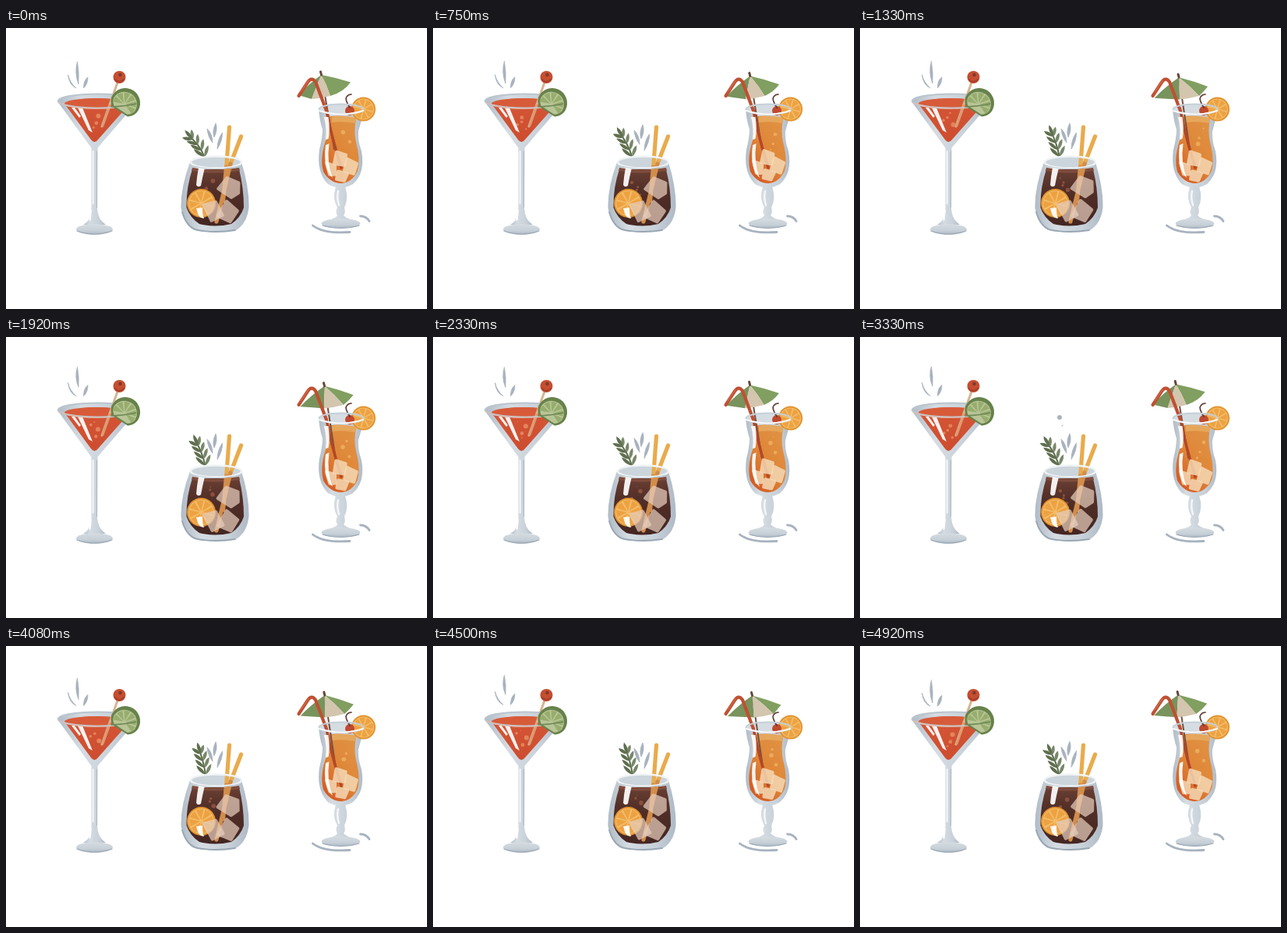
Animation of 540x360 px, one loop 5000 ms. Source, as an HTML page:

```html
<!DOCTYPE html>
<html lang="en">
<head>
<meta charset="utf-8">
<title>Three cocktails</title>
<style>
  html, body { margin: 0; width: 100%; height: 100%; overflow: hidden; background: #fff; }
  svg { display: block; width: 100vw; height: 100vh; }
  .line { fill: none; stroke-linecap: round; stroke-linejoin: round; }
  .ice { fill: #e6cdbc; stroke: #e6cdbc; stroke-width: 4; stroke-linejoin: round; opacity: .72; }
  #iceTop .ice { fill: #f6dcb9; stroke: #f6dcb9; opacity: .82; }
  .steam { fill: #a8b2be; stroke: #a8b2be; stroke-width: .8; stroke-linejoin: round; }
  .shine { fill: #fff; opacity: .92; }
</style>
</head>
<body>
<svg viewBox="0 0 540 360">
  <defs>
    <linearGradient id="wall" x1="0" x2="1">
      <stop offset="0" stop-color="#b0bbc6"/><stop offset=".3" stop-color="#d5dce2"/>
      <stop offset=".7" stop-color="#c8d1d9"/><stop offset="1" stop-color="#aeb9c5"/>
    </linearGradient>
    <linearGradient id="foot" x2="0" y2="1">
      <stop offset="0" stop-color="#d5dce1"/><stop offset=".65" stop-color="#c6cfd7"/>
      <stop offset="1" stop-color="#a9b5c1"/>
    </linearGradient>
    <linearGradient id="red" x2="0" y2="1">
      <stop offset="0" stop-color="#d55737"/><stop offset="1" stop-color="#cd4c2f"/>
    </linearGradient>
    <linearGradient id="amber" x1=".8" x2=".1" y2="1">
      <stop offset="0" stop-color="#e09244"/><stop offset=".5" stop-color="#df8638"/>
      <stop offset="1" stop-color="#d2521f"/>
    </linearGradient>
    <linearGradient id="cola" x2="0" y2="1">
      <stop offset="0" stop-color="#6a3f33"/><stop offset=".35" stop-color="#522f28"/>
      <stop offset="1" stop-color="#442622"/>
    </linearGradient>
  </defs>

  <!-- martini -->
  <g>
    <path id="puffM" class="steam"/>
    <path id="puffSides" class="steam" d="M79.500 60Q82 70 90 77Q81 73 79.500 60ZM105 63Q99.500 67 99.500 77Q105 72 105 63Z"/>
    <path d="M109.500 150H117.500L117 231Q118 246 128 252H99Q109 247 109.500 231Z" fill="url(#wall)"/>
    <path class="line" d="M111.700 158V225" stroke="#f3f5f7" stroke-width="2.200"/>
    <path class="line" d="M116.500 158V230" stroke="#aeb9c4" stroke-width="1.200"/>
    <ellipse cx="113.500" cy="258" rx="23.500" ry="6.800" fill="url(#foot)"/>
    <path class="line" d="M91 260Q113 268 136 260" stroke="#9ba8b5" stroke-width="1.200"/>
    <path class="line" d="M109 234L107.500 246" stroke="#fff" stroke-width="2"/>
    <path d="M66 94L109 153Q113.500 158 118 153L168 95Q158 84 118 84Q72 84 66 94Z" fill="url(#wall)"/>
    <path d="M75 97L109 143Q113.500 149 118 143L157 99Q140 90 118 90Q90 90 75 97Z" fill="url(#red)"/>
    <ellipse cx="116" cy="97" rx="41" ry="7" fill="#d85b39"/>
    <path class="line" d="M143 70L123 126" stroke="#d3b692" stroke-width="3"/>
    <path class="line" d="M133 100L124 125" stroke="#df9a72" stroke-width="3.200"/>
    <g id="fizzRed" fill="#e8966a"></g>
    <path class="shine" d="M84 102L88 102L96 113L94 115ZM92 102L98 102L111 134L106 131Z"/>
    <ellipse cx="118" cy="93.500" rx="51" ry="9" class="line" stroke="#bac5ce" stroke-width="2.200"/>
    <path class="line" d="M68 96Q88 104 122 103Q148 102 160 97" stroke="#e6bdad" stroke-width="1.200"/>
    <circle cx="145.500" cy="63" r="8" fill="#c54e31"/>
    <path class="line" d="M140 66Q145 72 151 66" stroke="#a83f29" stroke-width="2"/>
    <circle cx="146.500" cy="60" r="2.200" fill="#80392b"/>
    <g transform="rotate(33 153 96)">
      <path d="M134 99A19.200 19.200 0 1 1 172 99Q170 106 165 109H142Q136 106 134 99Z" fill="#67824b"/>
      <g id="lime"></g>
    </g>
    <path class="line" d="M135 101Q155 100 167 97" stroke="#6f8857" stroke-width="1.300"/>
  </g>

  <!-- tumbler -->
  <g>
    <g id="herb"></g>
    <path id="puffs" class="steam" d="M258 129Q265 136 265 147Q259 140 258 129ZM269 122Q272 130 267 140Q264 132 269 122ZM277.500 134Q278 144 271 155Q271 143 277.500 134Z"/>
    <g id="drop" class="steam"><circle cx="256" cy="103" r="2.600"/><circle cx="259.500" cy="113.500" r=".5"/></g>
    <path d="M236 172Q224 204 224.500 230Q227 251 241 259Q268 264 295 259Q309 251 311.500 230Q312 204 302 172Z" fill="url(#wall)"/>
    <path d="M239 181Q231 205 231.500 230Q236 243 248 251Q268 256 289 251Q301 243 305 230Q305 205 299 181Z" fill="url(#cola)"/>
    <ellipse cx="269" cy="172" rx="33" ry="8" fill="#ccd5dc"/>
    <path d="M239 179Q269 184 299 179L300 183Q269 188 238 183Z" fill="#7f4c3c"/>
    <g class="line" stroke-width="5.200" stroke-linecap="butt">
      <path d="M286.500 127L282.500 180" stroke="#e9ab4c"/>
      <path d="M301.500 139L288 174" stroke="#e9ab4c"/>
      <path d="M282.500 178L278.500 222M288 174L270 248" stroke="#d18d4b"/>
    </g>
    <g id="fizzCola" fill="#9c5942"></g>
    <g id="sliceMid"></g>
    <g id="iceMid">
      <path class="ice" d="M272 206L283 192L298 198L298 211L289 217Z"/>
      <path class="ice" d="M283 222L297 234L288 248L272 241Z"/>
      <path class="ice" d="M254 227L269 223L278 240L264 247Z"/>
    </g>
    <path class="shine" d="M247 179H255Q252 191 250 202Q246 205 244 201Q245 189 247 179Z"/>
    <path class="shine" d="M244 231L252 230Q252 240 254 244Q247 245 244 231Z"/>
    <ellipse cx="269.500" cy="172" rx="32.500" ry="7.500" class="line" stroke="#f1f4f5" stroke-width="2.400"/>
    <path class="line" d="M237 176Q269 185 302 176" stroke="#bec9d1" stroke-width="1.200"/>
    <path class="line" d="M226 236Q232 256 246 259Q269 263 294 259" stroke="#98a6b4" stroke-width="1.800"/>
  </g>

  <!-- hurricane -->
  <g>
    <path class="line" d="M393.500 253Q407 264 441 261.500M454.500 241Q462 241 466 247.500" stroke="#a8b3bf" stroke-width="2.800"/>
    <path d="M423 203H435Q440 219 434 230Q436 237 433 240Q437 245 449 247H411Q423 244 425 240Q422 236 425 230Q418 219 423 203Z" fill="url(#wall)"/>
    <path class="line" d="M426 209Q424 217 427 227" stroke="#f4f6f8" stroke-width="2.500"/>
    <ellipse cx="429.500" cy="250.500" rx="24.800" ry="6.300" fill="url(#foot)"/>
    <path class="line" d="M406 253Q429 260 453 253" stroke="#9daab6" stroke-width="1.200"/>
    <path d="M401 103Q402 118 406 130Q406 140 402 156Q398 185 413 200Q429 209 445 200Q461 186 456 158Q451 144 452 132Q457 117 459 103Z" fill="url(#wall)"/>
    <path d="M409 114Q413 128 411 141Q402 166 407 184Q416 199 430 199Q444 198 451 183Q455 168 449 146Q446 133 449 116Q430 110 409 114Z" fill="url(#amber)"/>
    <path d="M418 114Q434 111 449 115L448.500 122Q432 119 418 121Z" fill="#e5a75c"/>
    <ellipse cx="430" cy="104" rx="28.500" ry="7" fill="#d5dde3"/>
    <g id="sliceTop"></g>
    <path id="stick" class="line" stroke="#74503f" stroke-width="2"/>
    <path id="leftPanel" fill="#78935c"/>
    <path id="rightPanel" fill="#809f60"/>
    <path id="midPanel" fill="#d3c5ae"/>
    <path id="tip" class="line" stroke="#65483a" stroke-width="3"/>
    <path class="line" d="M375.500 87L387 69.500Q392 62 397 69L411 106" stroke="#bf5033" stroke-width="4.200"/>
    <path class="line" d="M378 82L388 67.500" stroke="#d87553" stroke-width="1"/>
    <path class="line" d="M411.500 108Q417 137 430 179" stroke="#b44727" stroke-width="3.600"/>
    <g id="fizzAmber" fill="#f0b566"></g>
    <circle cx="441" cy="106" r="6" fill="#c04a2f"/>
    <path class="line" d="M441 102Q434 91 437 88Q439 85 443 85" stroke="#613d33" stroke-width="1.700"/>
    <g id="iceTop">
      <path class="ice" d="M424 158L436 162L434 175L421 173Z"/>
      <path class="ice" d="M438 167L450 173L446 186L434 182Z"/>
      <path class="ice" d="M411 172L422 176L422 187L415 187Z"/>
      <path class="ice" d="M426 183L438 186L434 195L424 193Z"/>
    </g>
    <path class="shine" d="M408 114H413.500Q416 130 413.500 142L410 143Q412 130 408 114Z"/>
    <path class="shine" d="M410 150L414.500 148Q411 172 419 192Q406 180 410 150Z"/>
    <ellipse cx="430" cy="104" rx="28.500" ry="6.500" class="line" stroke="#c6d0d8" stroke-width="2"/>
    <path class="line" d="M402 106Q430 115 458 106" stroke="#f7f8f9" stroke-width="2"/>
  </g>
</svg>
<script>
const FRAMES = 60, LOOP = 5000;
const el = id => document.getElementById(id);
const mix = (a, b, k) => a + (b - a) * k;
const polar = (r, deg) => [r * Math.cos(deg * Math.PI / 180), r * Math.sin(deg * Math.PI / 180)];
const wave = (f, cycles, shift = 0) => Math.sin(2 * Math.PI * (f * cycles / FRAMES + shift));

// keys: [frame, value] pairs, eased between neighbours
function track(keys, f) {
  let i = 0;
  while (i < keys.length - 2 && f >= keys[i + 1][0]) i++;
  const [f0, a] = keys[i], [f1, b] = keys[i + 1];
  return mix(a, b, (1 - Math.cos(Math.PI * (f - f0) / (f1 - f0))) / 2);
}

function wedges(cx, cy, r, from, to, count, fill) {
  const step = (to - from) / count;
  let out = '';
  for (let i = 0; i < count; i++) {
    const a = polar(r, from + step * i + 4), b = polar(r, from + step * (i + 1) - 4);
    const c = polar(1.8, from + step * (i + .5));
    out += `<path d="M${cx + c[0]} ${cy + c[1]}L${cx + a[0]} ${cy + a[1]}A${r} ${r} 0 0 1 ${cx + b[0]} ${cy + b[1]}Z" fill="${fill}"/>`;
  }
  return out;
}

const orange = (cx, cy, r) =>
  `<circle cx="${cx}" cy="${cy}" r="${r}" fill="#e2932f"/>` +
  `<circle cx="${cx}" cy="${cy}" r="${r - 2}" fill="#f3bd6a"/>` +
  wedges(cx, cy, r - 3, 15, 375, 8, '#eda242');

el('lime').innerHTML =
  '<path d="M137 98A16 16 0 1 1 169 98Q167 105 163 107H143Q138 104 137 98Z" fill="#b9c596"/>' +
  wedges(153, 98, 15, -205, 25, 6, '#97ad6e');
el('sliceMid').innerHTML = orange(250.5, 224.5, 18.5);
el('sliceTop').innerHTML = orange(458.5, 104, 15.5);

// a stem that bends more towards its tip, with a pair of leaves at each joint
function sprig(lean) {
  const leaf = (x, y, deg, len, fill) =>
    `<path transform="translate(${x} ${y}) rotate(${deg})" d="M0 0Q-4.600 ${-len * .6} 0 ${-len}Q4.200 ${-len * .5} 0 0Z" fill="${fill}"/>`;
  const joints = 4, gap = 9;
  let x = 257, y = 174, stem = `M${x} ${y}`, leaves = '';
  for (let i = 0; i < joints; i++) {
    const deg = lean * (.55 + i * .3), [dx, dy] = polar(gap, deg - 90);
    x += dx; y += dy;
    stem += `L${x} ${y}`;
    leaves += leaf(x, y, deg - 38, 17 - i, '#5f6f4e') + leaf(x, y, deg + 34, 16 - i, '#78876a');
  }
  return `<path class="line" d="${stem}" stroke="#5c6a4b" stroke-width="2"/>` +
    leaves + leaf(x, y, lean * 1.4, 16, '#5f6f4e');
}

const steamTop = [[0, 43], [3, 41], [7, 45], [12, 37.5], [17, 43], [26, 37], [33, 46],
  [41, 37.5], [45, 34], [49, 41], [53, 37], [60, 44]];
const herbLean = [[0, -29], [18, -14], [34, -26], [51, -11], [68, -24]];
const umbrellaSway = [[0, 0], [18.5, .95], [36, 0], [53, 1], [70, 0]];

function drawSteam(f) {
  const top = track(steamTop, f), end = 77 + (top - 46) * 1.7, mid = (top + end) / 2;
  el('puffM').setAttribute('d',
    `M91.500 ${top}Q87.500 ${mid} 93 ${end}Q94 ${mid} 91.500 ${top}Z`);
  el('puffSides').setAttribute('transform', `translate(0 ${(top - 43) * .3})`);
  el('puffs').setAttribute('transform', `translate(0 ${1 - wave(f, 4, .2)})`);
  const drop = el('drop');
  drop.style.display = f > 37 && f < 43 ? '' : 'none';
  drop.setAttribute('transform', `translate(0 ${(40 - f) * 2})`);
}

function drawUmbrella(f) {
  const k = track(umbrellaSway, f);
  const at = (ax, ay, bx, by) => [mix(ax, bx, k), mix(ay, by, k)];
  const apex = at(404.5, 60, 409.5, 63.5), left = at(375, 86, 378, 90);
  const m1 = at(392, 91, 412, 91.5), m2 = at(416, 87, 437, 87), right = at(442, 69.5, 446.5, 75.5);
  const bow = (a, b, dx, dy) => `Q${(a[0] + b[0]) / 2 + dx} ${(a[1] + b[1]) / 2 + dy} ${b}`;
  const panel = (a, b, da, db, hem) =>
    `M${apex}${bow(apex, a, da, -1)}${bow(a, b, hem, hem)}${bow(b, apex, db, -1)}Z`;
  el('leftPanel').setAttribute('d', panel(left, m1, -2, 0, 0));
  el('midPanel').setAttribute('d', panel(m1, m2, 0, 1, 1));
  el('rightPanel').setAttribute('d', panel(m2, right, 1, 1, 4 * (1 - k)));
  el('stick').setAttribute('d', `M${apex}L${mix(421, 423, k)} 155`);
  el('tip').setAttribute('d', `M${apex}L${apex[0] - 1} ${apex[1] - 4}`);
}

// bubbles climb from y1 to y0 and start again
function fizz(id, f, spots, y0, y1, size) {
  el(id).innerHTML = spots.map((x, i) => {
    const p = (f / FRAMES * 2 + i * .382) % 1;
    const r = size * (.6 + (i % 3) * .2) * Math.min(1, 6 * p, 6 * (1 - p));
    return `<circle cx="${x + wave(f, 3, i * .3)}" cy="${mix(y1, y0, p)}" r="${r}" opacity=".75"/>`;
  }).join('');
}

function draw(f) {
  drawSteam(f);
  drawUmbrella(f);
  el('herb').innerHTML = sprig(track(herbLean, f));
  el('iceMid').setAttribute('transform', `translate(0 ${wave(f, 3) * .8}) rotate(${wave(f, 2, .1) * 1.5} 278 222)`);
  el('iceTop').setAttribute('transform', `translate(0 ${wave(f, 3, .3) * .8}) rotate(${wave(f, 2) * 1.5} 430 178)`);
  fizz('fizzRed', f, [108, 115, 119, 113], 107, 131, 3);
  fizz('fizzCola', f, [261, 256, 266, 262], 190, 215, 2.8);
  fizz('fizzAmber', f, [436, 440, 433], 126, 158, 2.8);
}

let shown = -1;
function tick(now) {
  const f = Math.floor((now % LOOP + 3.4) * FRAMES / LOOP) % FRAMES;
  if (f !== shown) draw(shown = f);
  requestAnimationFrame(tick);
}
draw(0);
requestAnimationFrame(tick);
</script>
</body>
</html>
```
